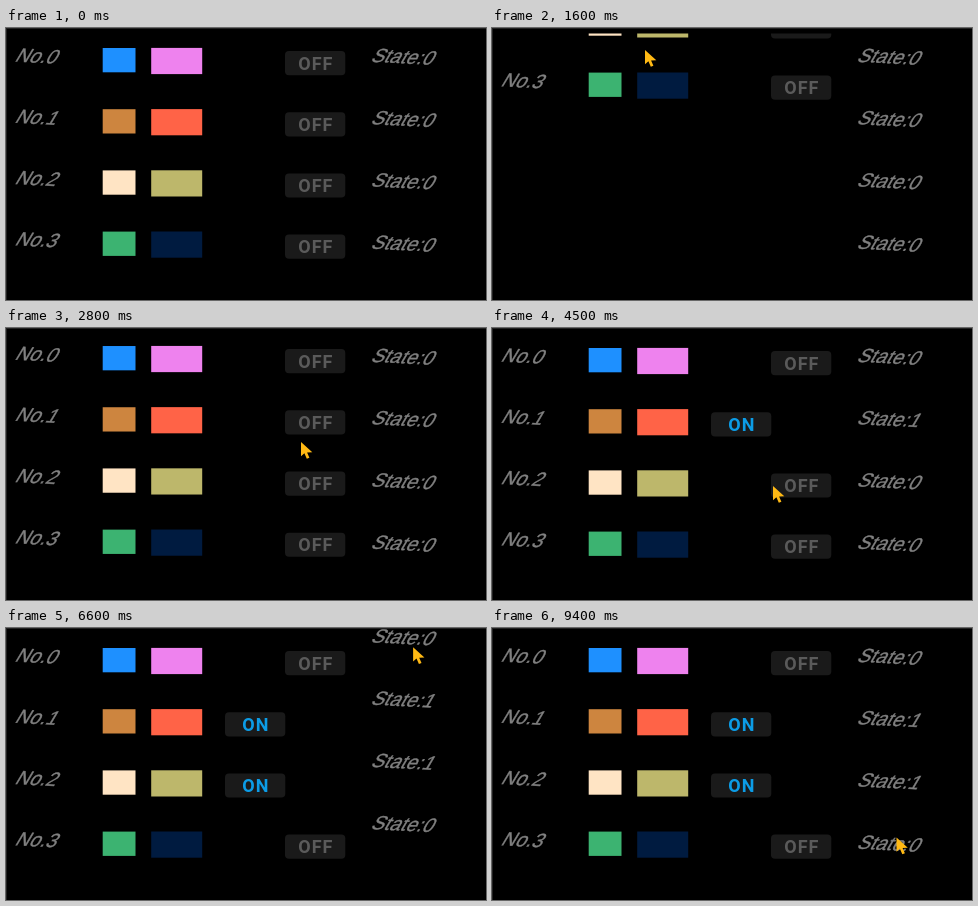
Animation of 480x272 px, one loop 9.6 s. Source, as an HTML page:

```html
<!DOCTYPE html>
<html lang="en">
<head>
<meta charset="utf-8">
<title>Switch list</title>
<style>
  html, body { margin: 0; width: 100%; height: 100%; overflow: hidden; background: #000; }
  svg { display: block; width: 100%; height: 100%; }
  .label {
    font: 19px "Liberation Sans", Arial, sans-serif; letter-spacing: .2px;
    fill: #808080; stroke: #808080; stroke-width: .35px;
  }
  .switch rect { fill: #1a1a1a; }
  .switch text { font: 700 18px Roboto, sans-serif; letter-spacing: 1px; text-anchor: middle; fill: #5a5a5a; }
  .switch.on text { fill: #0c9ce6; }
</style>
</head>
<body>
<svg viewBox="0 0 480 272">
  <clipPath id="view"><rect y="5.5" width="480" height="261"/></clipPath>
  <path d="M0 .5H480M.5 0V272" stroke="#222"/>
  <g clip-path="url(#view)"><g id="items"></g></g>
  <g id="states"></g>
  <path id="cursor" fill="#ffb914" d="M0 0V14.2L3.4 11.2 5.8 16.8 8.4 15.7 6.1 10.4 11.3 10.2Z"/>
</svg>
<script>
const LOOP = 9600, STEP = 100, SLIDE = 300;
const $ = id => document.getElementById(id);
const items = $('items'), states = $('states'), cursor = $('cursor');

function add(parent, tag, attrs = {}, text = '') {
  const el = document.createElementNS('http://www.w3.org/2000/svg', tag);
  for (const key in attrs) el.setAttribute(key, attrs[key]);
  el.textContent = text;
  return parent.appendChild(el);
}
const label = (parent, x, y, text) =>
  add(parent, 'text', { class: 'label', transform: `matrix(1 .05 -.6 1 ${x} ${y})` }, text);
const move = (el, x, y) => el.setAttribute('transform', `translate(${x} ${y})`);
const clamp = v => Math.min(1, Math.max(0, v));

// Each row: two swatch colours and, if it gets switched, the click time.
const rows = [
  ['#1e90ff', '#ee82ee'],
  ['#cd853f', '#ff6347', 3400],
  ['#ffe4c4', '#bdb76b', 4700],
  ['#3cb371', '#001b40']
].map(([left, right, clickAt = Infinity], i) => {
  const y = i * 61.2;
  label(items, 8, 33.6 + y, 'No.' + i);
  add(items, 'rect', { x: 96.7, y: 20 + y, width: 32.8, height: 24.3, fill: left });
  add(items, 'rect', { x: 145.2, y: 19.9 + y, width: 51, height: 26.2, fill: right });
  const knob = add(items, 'g', { class: 'switch' });
  add(knob, 'rect', { x: 279, y: 23 + y, width: 60.3, height: 24.2, rx: 4 });
  const caption = add(knob, 'text', { x: 309.8, y: 41.6 + y });
  const state = label(states, 364, 33.7 + i * 62.3, '');
  return { clickAt, knob, caption, state };
});

// Places the pointer stops at: time, x, y.
const stops = [
  [400, 190, 205], [1100, 158, 181], [1600, 153, 22], [2100, 153, 22], [2500, 190, 216],
  [2800, 295, 114], [3700, 303, 99], [4500, 281, 158], [4800, 282, 156], [5100, 289, 69],
  [5700, 288, 32], [6000, 411, 62], [6500, 408, 8], [7200, 392, 212], [7500, 392, 256],
  [8200, 396, 273], [9400, 404.5, 209.5]
];

function pointerAt(t) {
  const next = stops.findIndex(stop => stop[0] > t);
  if (next < 1) return stops.at(next).slice(1);
  const [t0, x0, y0] = stops[next - 1], [t1, x1, y1] = stops[next];
  const p = (t - t0) / (t1 - t0), eased = p * p * (3 - 2 * p);
  return [x0 + (x1 - x0) * eased, y0 + (y1 - y0) * eased];
}

// A list follows the pointer while held, then springs back.
function dragged(t, press, release) {
  if (t < press) return 0;
  const offset = pointerAt(Math.min(t, release))[1] - pointerAt(press)[1];
  const rest = Math.max(0, t - release) / 150;
  return offset * Math.exp(-rest) * Math.cos(rest);
}

function draw() {
  const t = Math.floor(performance.now() % LOOP / STEP) * STEP;
  move(items, 0, dragged(t, 1100, 2500));
  move(states, 0, dragged(t, 6100, 6500) + dragged(t, 7200, 7500));
  for (const { clickAt, knob, caption, state } of rows) {
    const on = t >= clickAt;
    move(knob, -60 * clamp((t - clickAt + STEP) / SLIDE), 0);
    knob.classList.toggle('on', on);
    caption.textContent = on ? 'ON' : 'OFF';
    state.textContent = 'State:' + Number(on);
  }
  move(cursor, ...pointerAt(t));
  const away = t < 400 || (t >= 8200 && t < 9400);
  cursor.style.display = away ? 'none' : '';
  requestAnimationFrame(draw);
}
draw();
</script>
</body>
</html>
```
